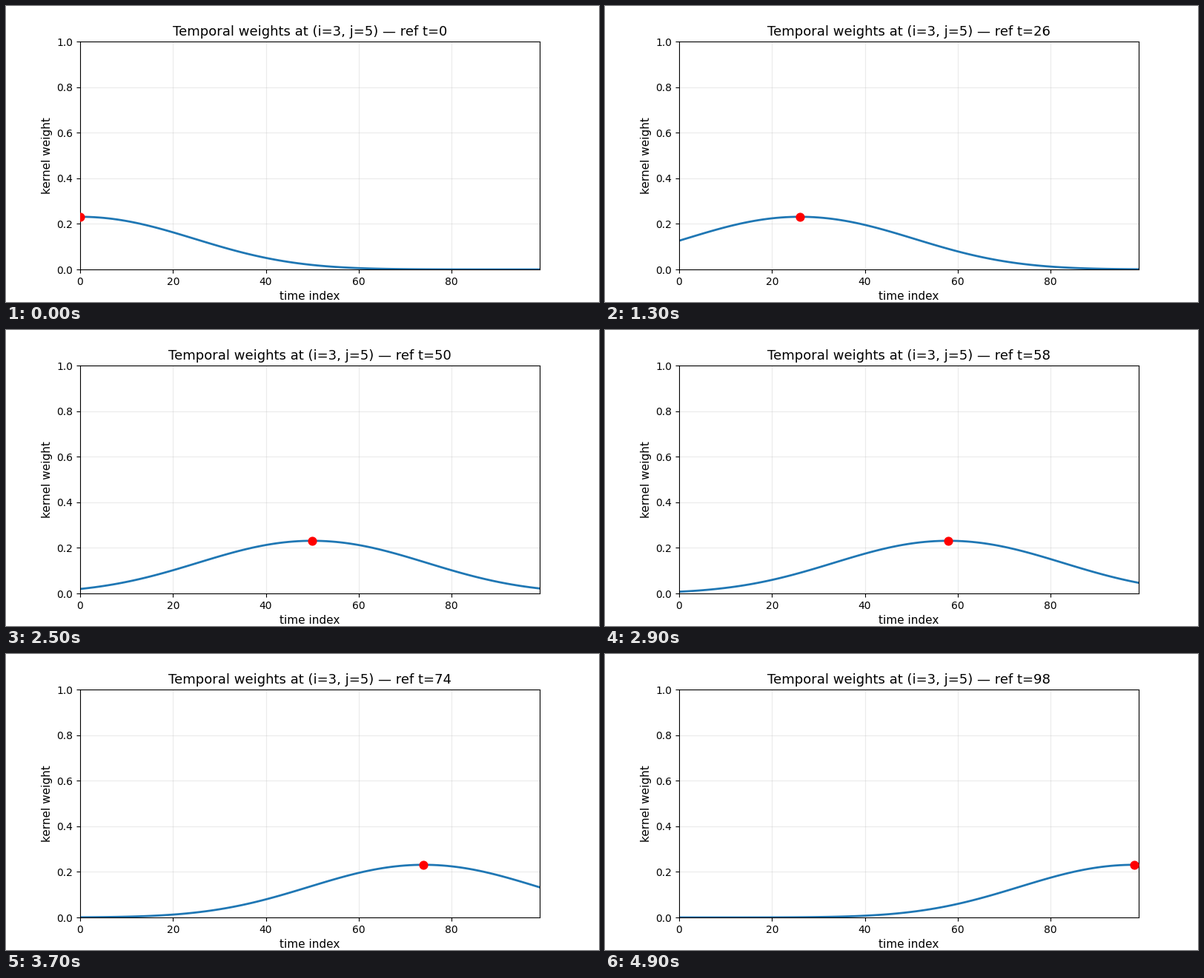
Recreate the animation shown at these times as a matplotlib script. Size 800 by 400 pixels, loop 5 s.

```python
import numpy as np
import matplotlib.pyplot as plt
from matplotlib.animation import FuncAnimation

N_TIMES = 100
STEP = 2
PEAK = 0.231

times = np.arange(N_TIMES)


def kernel(ref):
    """Bell-shaped weight around ref whose tail falls faster than a Gaussian."""
    lag = np.abs(times - ref)
    return PEAK * np.exp(-lag**2 / 1250 - 3.7e-6 * lag**3)


plt.rcParams["font.family"] = "DejaVu Sans"
fig, ax = plt.subplots(figsize=(8, 4), dpi=100)
ax.set_xlim(0, N_TIMES - 1)
ax.set_ylim(0, 1)
ax.set_xlabel("time index", fontsize=11)
ax.set_ylabel("kernel weight", fontsize=11)
ax.grid(alpha=0.25)

curve, = ax.plot(times, kernel(0), lw=2, color="tab:blue")
marker = ax.scatter([0], [PEAK], s=60, color="red", zorder=3)
title = ax.set_title("", fontsize=13)


def update(frame):
    ref = frame * STEP
    curve.set_ydata(kernel(ref))
    marker.set_offsets([(ref, PEAK)])
    title.set_text(f"Temporal weights at (i=3, j=5) — ref t={ref}")
    return curve, marker, title


anim = FuncAnimation(fig, update, frames=N_TIMES // STEP, interval=100,
                     repeat=True, repeat_delay=0, blit=False)
plt.show()
```
